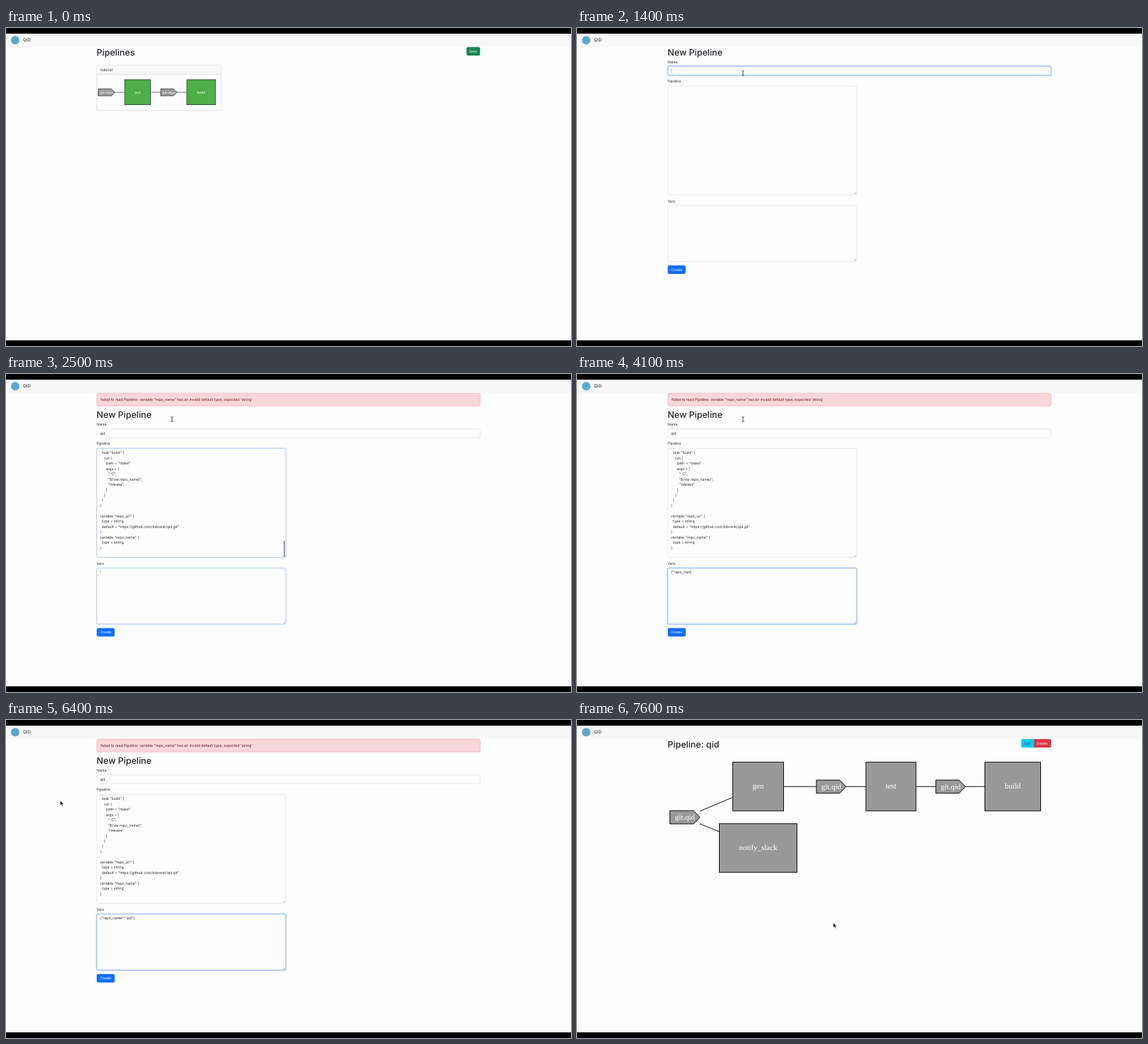
These frames come from a looping animation (800 by 450 pixels, 8000 ms). An HTML page:

```html
<!DOCTYPE html>
<html lang="en">
<head>
<meta charset="utf-8">
<title>New pipeline</title>
<style>
  html, body { margin: 0; width: 100%; height: 100%; overflow: hidden; background: #000; }
  svg { display: block; width: 100vw; height: 100vh; }
  text { font-family: Inter, sans-serif; white-space: pre; text-rendering: geometricPrecision; }
  .graph text { font-family: "Liberation Serif", serif; fill: #fff; text-anchor: middle; }
  .graph { stroke: #111; }
  .graph text { stroke: none; }
</style>
</head>
<body>
<svg id="stage" viewBox="0 0 800 450"></svg>
<script>
const stage = document.getElementById('stage');
const LOOP = 8000, STEP = 100;
const PAPER = '#fefdfe', INK = '#212529', GREY = '#999', GREEN = '#4dae4a';

const CODE = [
  '  }',
  '  task "build" {',
  '    run {',
  '      path = "make"',
  '      args = [',
  '        "-C",',
  '        "${var.repo_name}",',
  '        "release"',
  '      ]',
  '    }',
  '  }',
  '}',
  '',
  'variable "repo_url" {',
  '  type = string',
  '  default = "https://github.com/tobrenk/qid.git"',
  '}',
  'variable "repo_name" {',
  '  type = string',
  '}'
];
const VARS = '{"repo_name":"qid"}';
const ERROR = 'failed to read Pipeline: variable "repo_name" has an invalid default type, expected \'string\'';

// When each further character of the vars text appears
const VAR_KEYS = [3300, 3400, 3500, 3600, 3700, 3800, 3900, 4100, 4100, 4100,
  4200, 4300, 5100, 5200, 5200, 5300, 5300, 5500, 5700];
const NAME_KEYS = [1500, 1600, 1700];

// Pointer path: time, x, y
const PATH = [
  [200, 648, 58], [300, 661, 31], [500, 661, 31], [1000, 235, 64], [5900, 235, 64],
  [6200, 80.5, 110.5], [6500, 75, 116], [6800, 128, 351], [7000, 142, 338.5],
  [7400, 142, 338.5], [7600, 363, 287], [LOOP, 363, 287]
];

const clamp = v => Math.max(0, Math.min(1, v));
const typed = (text, keys, t) => text.slice(0, keys.filter(k => k <= t).length);
// Strength of a focus ring held from one time to another
const focus = (t, from, to) => clamp((t - from) / 200) - clamp((t - to) / 200);

const rect = (x, y, w, h, fill, more = '') =>
  `<rect x="${x}" y="${y}" width="${w}" height="${h}" fill="${fill}" ${more}/>`;
const text = (x, y, s, size = 5.1, fill = INK, more = '') =>
  `<text x="${x}" y="${y}" font-size="${size}" fill="${fill}" ${more}>${s}</text>`;
const title = s => text(128.3, 39, s, 12.5, INK, 'font-weight="500"');
const caret = on => on ? '<tspan dx="-.7" font-size="6" font-weight="200">|</tspan>' : '';
const button = (x, y, w, s, fill, ink = '#fff') =>
  rect(x, y, w, 12, fill, 'rx="2"') +
  text(x + w / 2, y + 7.7, s, 5.1, ink, 'text-anchor="middle"');

function field(x, y, w, h, ring) {
  return rect(x, y, w, h, PAPER, 'rx="2" stroke="#dee2e6" stroke-width=".7"') +
    (ring > 0 ? `<g opacity="${ring}">` +
      rect(x - .7, y - .7, w + 1.4, h + 1.4, 'none', 'rx="2.5" stroke="#c2dbfe" stroke-width="1.3"') +
      rect(x, y, w, h, 'none', 'rx="2" stroke="#86b7fe" stroke-width=".7"') + '</g>' : '');
}

function area(y, h, ring) {
  const b = y + h;
  return field(128.5, y, 267.5, h, ring) +
    `<path d="M392.5 ${b - .8}l2.7-2.7M394 ${b - .8}l1.2-1.2" stroke="#777" stroke-width=".5"/>`;
}

const job = (x, y, w, h, s, size, fill = GREY) =>
  rect(x, y, w, h, fill) + text(x + w / 2, y + h / 2 + size * .3, s, size);
const input = (x, y, w, h, s, size) =>
  `<path d="M${x} ${y}h${w - h * .48}l${h * .48} ${h / 2}l${-h * .48} ${h / 2}H${x}z" fill="${GREY}"/>` +
  text(x + w / 2 + size * .02, y + h / 2 + size * .3, s, size);
const graph = (lines, nodes, more) => `<g class="graph" ${more}><path d="${lines}"/>${nodes}</g>`;

const pipeline = (more = '') => graph(
  'M174 129L220.5 109.500M174 147L201.500 158M292 94.200H339M381 94.200H409M480 94.200H508M550 94.200H578',
  input(131.5, 128.3, 42.5, 18.7, 'git.qid', 10.95) +
  job(220.5, 59.7, 72, 69, 'gen', 10.95) +
  job(201.5, 146.7, 110, 69, 'notify_slack', 10.95) +
  input(339, 85, 42, 18.7, 'git.qid', 10.95) +
  job(409, 59.7, 71, 69, 'test', 10.95) +
  input(508, 85, 42, 18.7, 'git.qid', 10.95) +
  job(577.5, 59.7, 79, 69, 'build', 10.95), more);

function listPage() {
  return title('Pipelines') + button(652, 27, 19.3, 'New', '#198754', '#dff7f7') +
    rect(128.7, 52.5, 176, 64, PAPER, 'rx="2" stroke="#d8d8d9" stroke-width=".7"') +
    rect(129, 52.8, 175.4, 12.8, '#f7f7f7', 'rx="1.700"') +
    rect(128.7, 65.3, 176, .6, '#d8d8d9') + text(134, 60.5, 'tutorial') +
    graph('M154 91H168M205 91H219M242 91H256',
      input(130.5, 86, 23.5, 10, 'git-repo', 5.7) + job(168, 73, 36.7, 35.7, 'test', 5.7, GREEN) +
      input(219, 86, 23, 10, 'git-repo', 5.7) + job(256, 73, 40.7, 35.7, 'build', 5.7, GREEN),
      'stroke-width=".6"');
}

function formPage(t) {
  const failed = t >= 2400 && t < 6500;
  const blinkOff = (t >= 2800 && t < 3100) || (t >= 4500 && t < 4700) || t >= 4900 && t < 5100;
  const bar = t < 1900 ? 0 : t < 6500 ? .85 * clamp((3600 - t) / 200) : .25;
  const code = t < 1900 ? '' : CODE.map((s, i) => text(133, 82.2 + i * 7.49, s)).join('');
  const alert = rect(128.7, 27.2, 542.6, 18, '#f8d7da', 'rx="2" stroke="#f1aeb5" stroke-width=".7"') +
    text(134, 38, ERROR, 5.1, '#58151c');
  return (failed ? alert : '') + `<g transform="translate(0 ${failed ? 23.4 : 0})">` +
    title('New Pipeline') +
    text(128.3, 49.9, 'Name') + field(128.7, 54.2, 542.6, 12.6, focus(t, 1000, 1700)) +
    text(133, 62.3, typed('qid', NAME_KEYS, t) + caret(t >= 1100 && t < 1800)) +
    text(128.3, 77, 'Pipeline') + area(82, 154, focus(t, 1700, 2400)) +
    `<g clip-path="url(#code)">${code}</g>` +
    rect(393.2, 212.5, 1.6, 22.5, '#777', `opacity="${bar}"`) +
    text(128.3, 246.8, 'Vars') + area(251.4, 79, focus(t, 2400, 6400)) +
    text(133, 258.7, typed(VARS, VAR_KEYS, t) + caret(t >= 2500 && t < 5700 && !blinkOff)) +
    button(128.5, 336, 25.3, 'Create', t >= 6900 ? '#0b5ed7' : '#0d6efd') + '</g>' +
    (t >= 6500 ? pipeline('transform="translate(340.5 49.7) scale(.492)"') : '');
}

function viewPage() {
  return title('Pipeline: qid') +
    rect(629, 27, 20, 12, '#0dcaf0', 'rx="2"') + rect(646, 27, 25.3, 12, '#dc3545', 'rx="2"') +
    rect(644, 27, 3, 12, '#0dcaf0') +
    text(637.5, 34.7, 'Edit', 5.1, '#4b4a78', 'text-anchor="middle"') +
    text(658.500, 34.7, 'Delete', 5.1, '#fff', 'text-anchor="middle"') + pipeline();
}

function pointer(t) {
  if (t < PATH[0][0]) return '';
  const i = PATH.findIndex(p => p[0] > t);
  const [t0, x0, y0] = PATH[i - 1], [t1, x1, y1] = PATH[i];
  const k = (t - t0) / (t1 - t0);
  const x = x0 + (x1 - x0) * k, y = y0 + (y1 - y0) * k;
  const hand = (t >= 300 && t <= 500) || (t >= 7000 && t < 7400);
  const beam = t >= 1000 && t < 6000;
  const shape = beam
    ? '<path d="M-1.700-3.300Q-.2-3.300 0-2.800Q.2-3.300 1.700-3.300M0-2.800V2.800M-1.700 3.300Q-.2 3.300 0 2.800Q.2 3.300 1.700 3.300" fill="none" stroke="#333" stroke-width=".9"/>'
    : hand
      ? '<path d="M-.7.5Q0-.3.7.5V3.300L3.600 4Q4.300 4.300 4 6L3.300 8.800H-.3L-2.300 5.800Q-2.300 4.700-.7 5.500z" stroke="#fff" stroke-width=".4"/>'
      : '<path d="M0 0V6.500L1.500 5.200L2.600 7.800L3.700 7.300L2.600 4.800H4.700z" stroke="#fff" stroke-width=".4"/>';
  return `<g transform="translate(${x} ${y})">${shape}</g>`;
}

function scene(t) {
  const page = t < 500 ? listPage() : t < 7400 ? formPage(t) : viewPage();
  return '<clipPath id="code"><rect x="129" y="82.300" width="267" height="153.400"/></clipPath>' +
    rect(0, 0, 800, 450, '#000') + rect(0, 8, 800, 434, PAPER) + rect(0, 8, 800, 19, '#f8f8f9') +
    '<circle cx="13" cy="17.300" r="6" fill="#5aa9cd"/>' +
    text(24, 18.8, 'QID', 6.2) + page + pointer(t);
}

let shown = -1;
function tick() {
  const t = Math.floor(performance.now() % LOOP / STEP) * STEP;
  if (t !== shown) stage.innerHTML = scene(shown = t);
  requestAnimationFrame(tick);
}
tick();
</script>
</body>
</html>
```
